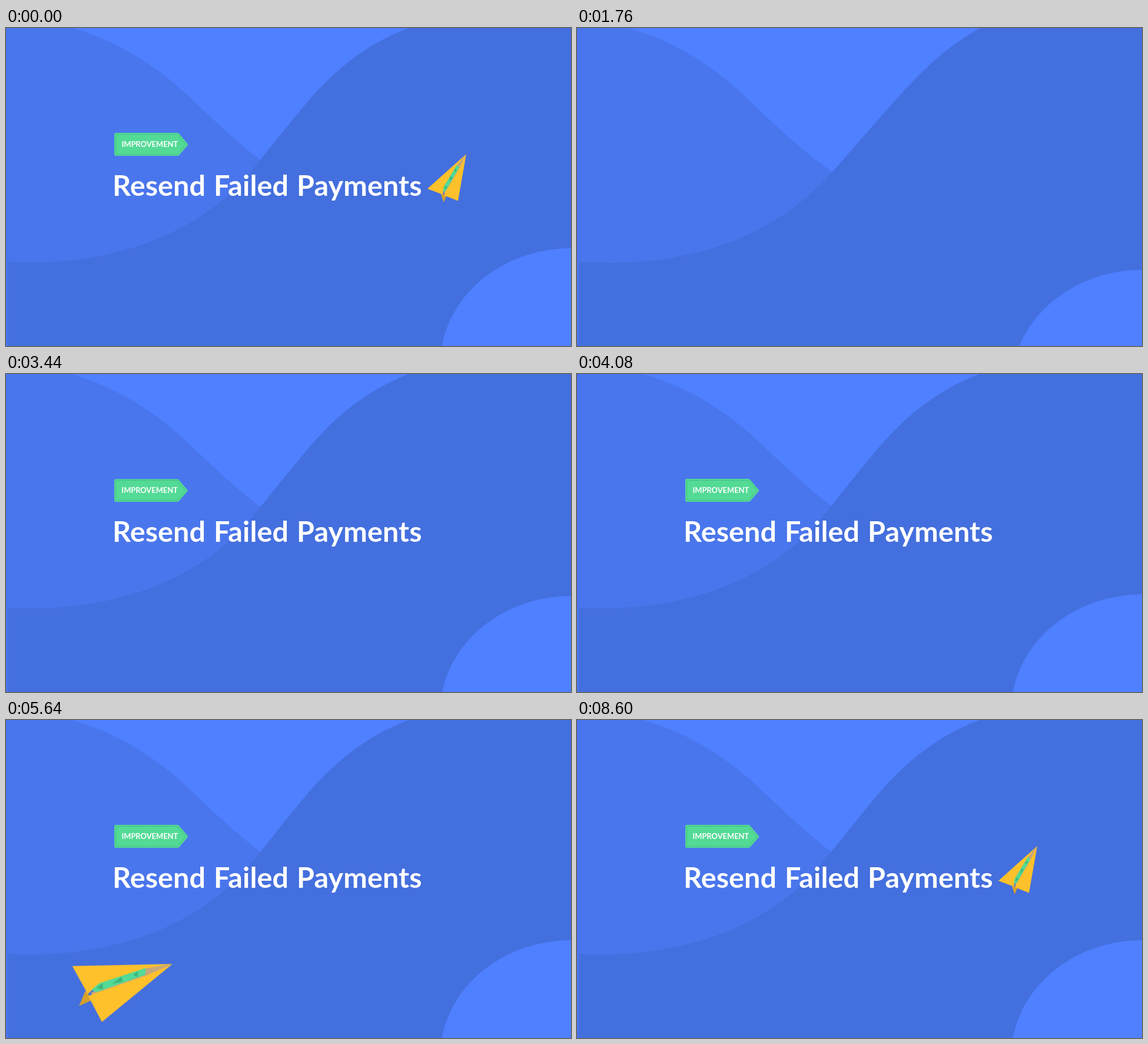
Recreate the animation shown at these times as an HTML page without scripts. Size 960x540 px, loop 8640 ms.

```html
<!DOCTYPE html>
<html lang="en">
<head>
<meta charset="utf-8">
<title>Resend Failed Payments</title>
<style>
  :root {
    --sky: #4e80ff;
    --hill: #4a76ed;
    --sea: #446fde;
    --paper: #ffc12b;
    --fold: #d6a02b;
    --mint: #53da95;
    --leaf: #3db67a;
    --out: cubic-bezier(.33, 0, .08, 1);
  }
  html, body { margin: 0; width: 100%; height: 100%; overflow: hidden; background: var(--sky); }
  svg { display: block; width: 100vw; height: 100vh; }
  text { font-family: Lato, "Open Sans", sans-serif; font-weight: 700; fill: #fff; }

  /* Base styles hold the resting pose; each cycle starts after the short delay. */
  .anim { animation: 8640ms linear 40ms infinite; }

  .hill { fill: var(--hill); animation-name: hill; }
  .sea { fill: var(--sea); animation-name: sea; }
  .sun { fill: var(--sky); animation-name: sun; }
  .paper { fill: var(--paper); }
  .fold { fill: var(--fold); }
  .mint { fill: var(--mint); }
  .leaf { fill: var(--leaf); }
  .line { fill: none; stroke: var(--leaf); }

  .hill { d: path("M0 0 L113 0 C190 22 260 66 320 125 C365 168 395 195 432 224 L470 254 L470 540 L0 540 Z"); }
  @keyframes hill {
    0%, 10.65% {
      d: path("M0 0 L73 0 C150 22 215 62 270 115 C320 163 355 198 407 236 L440 260 L440 540 L0 540 Z");
      animation-timing-function: var(--out);
    }
    50.46%, 100% {
      d: path("M0 0 L113 0 C190 22 260 66 320 125 C365 168 395 195 432 224 L470 254 L470 540 L0 540 Z");
    }
  }

  .sea { d: path("M684 0 C600 32 545 85 500 140 C460 188 440 215 418 241 C333 347 193 398 40 398 C28 398 15 398 3 397 L3 540 L960 540 L960 0 Z"); }
  @keyframes sea {
    0%, 10.65% {
      d: path("M686 0 C645 30 605 70 565 113 C520 160 480 206 455 233 C355 345 230 399 66 399 C45 399 20 398 3 397 L3 540 L960 540 L960 0 Z");
      animation-timing-function: var(--out);
    }
    50.46%, 100% {
      d: path("M684 0 C600 32 545 85 500 140 C460 188 440 215 418 241 C333 347 193 398 40 398 C28 398 15 398 3 397 L3 540 L960 540 L960 0 Z");
    }
  }

  @keyframes sun {
    0%, 10.65% { transform: translateY(58px); animation-timing-function: var(--out); }
    50.46%, 100% { transform: none; }
  }

  .launch { transform-origin: 480px 262px; transform: translate(640px, -150px) rotate(-14deg); animation-name: launch; }
  @keyframes launch {
    0% { transform: scale(0); animation-timing-function: cubic-bezier(.2, .7, .3, 1.3); }
    4.63%, 12.96% { transform: none; animation-timing-function: ease-in-out; }
    15.74% { transform: translate(-108px, 8px) rotate(-4deg); animation-timing-function: cubic-bezier(.5, 0, .8, .6); }
    19.44%, 100% { transform: translate(640px, -150px) rotate(-14deg); }
  }

  .note { transform: translateY(44px); animation-name: note; }
  @keyframes note {
    0%, 6.02% { transform: translateY(-270px); animation-timing-function: cubic-bezier(.4, 0, .8, .8); }
    11.57% { transform: none; animation-timing-function: ease-out; }
    12.7%, 100% { transform: translateY(44px); }
  }

  .badge { transform-origin: 184px 217px; animation-name: badge; }
  @keyframes badge {
    0% { transform: scale(0); }
    24.54% { transform: scale(0); animation-timing-function: ease-out; }
    27.78% { transform: scale(1.155); animation-timing-function: ease-in-out; }
    30.56% { transform: scale(.955); animation-timing-function: ease-in-out; }
    33.1% { transform: scale(1.015); animation-timing-function: ease-in-out; }
    35.65% { transform: scale(.99); }
    39.35% { transform: scale(.995); }
    43.5%, 100% { transform: none; }
  }

  .title { word-spacing: 2px; letter-spacing: .1px; animation-name: title; }
  @keyframes title {
    0%, 26.85% { transform: translateY(60px); animation-timing-function: cubic-bezier(.3, 0, .1, 1); }
    34.95%, 100% { transform: none; }
  }

  .pass { transform-origin: 415px 77px; transform: translate(-545px, 215px) rotate(-30deg); animation-name: pass; }
  @keyframes pass {
    0%, 50.46% { transform: translate(275px, -137px) rotate(-25deg); }
    53.24% { transform: none; }
    59.26%, 100% { transform: translate(-545px, 215px) rotate(-30deg); }
  }

  .land { transform-origin: 749px 254px; animation-name: land; }
  @keyframes land {
    0%, 61.57% { transform: translate(-865px, 150px) rotate(50deg) scale(2); }
    65.74% { transform: translate(-480px, 185px) rotate(38deg) scale(1.9); }
    69.44% { transform: translate(-130px, 95px) rotate(14deg) scale(1.3); }
    71.76% { transform: translate(0, 0) rotate(0) scale(1); animation-timing-function: ease-out; }
    73.15% { transform: translate(5px, -34px); animation-timing-function: ease-in-out; }
    75.93% { transform: translate(-1.5px, 9.5px); animation-timing-function: ease-in-out; }
    79.4% { transform: translate(.5px, -4px); animation-timing-function: ease-in-out; }
    82.4% { transform: translate(-.4px, 2px); animation-timing-function: ease-in-out; }
    86.1% { transform: translate(0, -1px); animation-timing-function: ease-in-out; }
    90%, 100% { transform: none; }
  }
</style>
</head>
<body>
<svg viewBox="0 0 960 540" preserveAspectRatio="none">
  <defs>
    <clipPath id="slot"><path d="M380-400H610V240.6L380 245.5Z"/></clipPath>
    <clipPath id="mask"><rect x="170" y="238" width="560" height="60"/></clipPath>
    <clipPath id="panel"><rect x="411" y="213" width="110" height="44"/></clipPath>
  </defs>

  <path class="anim hill"/>
  <path class="anim sea"/>
  <ellipse class="anim sun" cx="960" cy="571" rx="222" ry="197"/>

  <g class="anim launch">
    <g clip-path="url(#slot)">
      <g class="anim note">
        <g transform="rotate(-1 466 234)">
          <rect class="mint" x="405.5" y="208.5" width="120" height="53"/>
          <g class="leaf" clip-path="url(#panel)">
            <circle cx="411" cy="213" r="14"/>
            <circle cx="521" cy="213" r="14"/>
            <circle cx="411" cy="257" r="14"/>
            <circle cx="521" cy="257" r="14"/>
            <circle cx="466" cy="234" r="16"/>
          </g>
          <rect class="line" x="411" y="213" width="110" height="44" stroke-width="2"/>
          <path d="M460 243V225L472 243V225M456.5 232H475.5M456.5 236.5H475.5"
                fill="none" stroke="var(--mint)" stroke-width="2.5"/>
        </g>
      </g>
    </g>
    <path class="fold" d="M393 246L587 242L394 306Z"/>
    <path class="paper" d="M390 244L587 241L398 254Z"/>
  </g>

  <g class="anim badge">
    <path class="mint" d="M187 178H291Q293 178 294.5 180L308.5 196.5Q309.5 198 308.5 199.5L294.5 215.5Q293 217 291 217H187Q184 217 184 214V181Q184 178 187 178Z"/>
    <path class="line" stroke-opacity=".7" d="M188.5 180.5H291L305.8 198L291 214.5H188.5Q186.5 214.5 186.5 212.5V182.5Q186.5 180.5 188.5 180.5Z"/>
    <text x="196.4" y="201.5" font-size="12.9">IMPROVEMENT</text>
  </g>

  <g clip-path="url(#mask)">
    <text class="anim title" x="181" y="284.5" font-size="48.5">Resend Failed Payments</text>
  </g>

  <g class="anim pass">
    <path fill="#b3acb8" d="M314 84L513 75.5L514 80L470 81.5L400 82.5Z"/>
    <path class="mint" d="M379 82L495 76V78.5L379 83.5Z"/>
    <path class="paper" d="M314 84L511 13L513.5 75.5Z"/>
    <path class="paper" d="M314 88L516 140.5L514 79.5Z"/>
  </g>

  <g class="anim land">
    <path class="fold" d="M739 282L743.5 296L749 284Z"/>
    <path fill="#c9a779" d="M782 214L765 233L744 280L749 284L771 239Z"/>
    <path class="paper" d="M782 214L716 273L742.5 283L744 270L766 233Z"/>
    <path class="paper" d="M782 214L768 293.5L744 284L747 278L771 237Z"/>
    <path class="mint" d="M766.5 232L770 237L747 277L742.5 278L744 269Z"/>
    <path class="leaf" d="M763 238L766 243L762 244ZM755 252L759 254L753 262ZM746 267L750 271L745 274Z"/>
  </g>
</svg>
</body>
</html>
```
